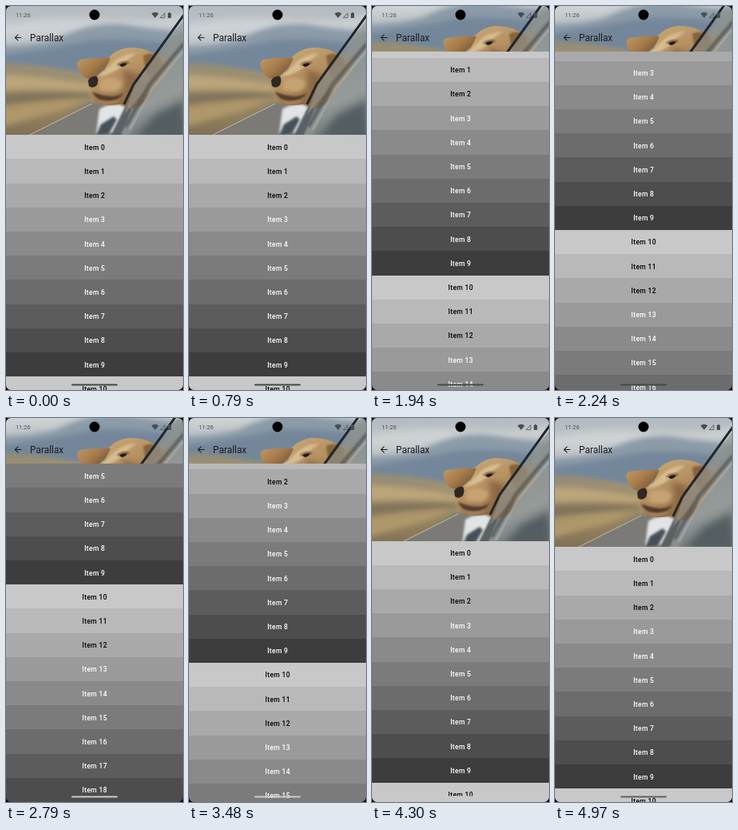
An HTML page with a canvas that plays this animation: 222 px wide and 480 px high, repeating every 5 s.

```html
<!DOCTYPE html>
<html lang="en">
<head>
<meta charset="utf-8">
<title>Parallax</title>
<style>
  html, body { margin: 0; width: 100%; height: 100%; overflow: hidden; background: #000; }
  canvas { display: block; width: 222px; height: 480px; }
</style>
</head>
<body>
<canvas id="stage" width="222" height="480"></canvas>
<script>
const W = 222, H = 480, LOOP = 5000;
const HEADER = 161.2, COLLAPSED = 57, ROW = 30.2, PARALLAX = 0.26;
const ctx = document.getElementById('stage').getContext('2d');

// Scroll offset over time: [ms, px]
const scrollKeys = [[0, 0], [1110, 0], [1520, 57], [1940, 126.5], [2790, 255], [3940, 66.5], [4430, 0], [LOOP, 0]];

const secant = i => (scrollKeys[i + 1][1] - scrollKeys[i][1]) / (scrollKeys[i + 1][0] - scrollKeys[i][0]);

const slopes = scrollKeys.map((_, i) => {
  if (i === 0 || i === scrollKeys.length - 1) return 0;
  const a = secant(i - 1), b = secant(i);
  return a * b <= 0 ? 0 : 2 * a * b / (a + b);
});

function scrollAt(t) {
  let i = 0;
  while (i < scrollKeys.length - 2 && t >= scrollKeys[i + 1][0]) i++;
  const [t0, y0] = scrollKeys[i], [t1, y1] = scrollKeys[i + 1];
  const d = t1 - t0, u = (t - t0) / d, v = 1 - u;
  return y0 * v * v * (1 + 2 * u) + y1 * u * u * (3 - 2 * u)
    + d * u * v * (slopes[i] * v - slopes[i + 1] * u);
}

const clamp01 = x => Math.min(1, Math.max(0, x));

function makePhoto() {
  const canvas = document.createElement('canvas');
  canvas.width = W;
  canvas.height = 164;
  const g = canvas.getContext('2d');
  const gradient = (x0, y0, x1, y1, ...colors) => {
    const fill = g.createLinearGradient(x0, y0, x1, y1);
    colors.forEach((c, i) => fill.addColorStop(i / (colors.length - 1), c));
    return fill;
  };
  const shape = (fill, path, blur = 0) => {
    g.filter = blur ? `blur(${blur}px)` : 'none';
    g.fillStyle = fill;
    g.fill(new Path2D(path));
  };
  const stroke = (color, width, path, blur = 0) => {
    g.filter = blur ? `blur(${blur}px)` : 'none';
    g.strokeStyle = color;
    g.lineWidth = width;
    g.stroke(new Path2D(path));
  };

  // Sky, hills, field and road
  shape(gradient(0, 0, 0, 70, '#b3bac0', '#c3c8cb', '#b9c0c4'), 'M0 0H222V164H0Z');
  shape('#ced2d4', 'M-10 26Q50 12 120 18T230 10V24Q110 34 -10 38Z', 5);
  shape('#8b9ba8', 'M-10 50Q30 50 62 42Q90 28 114 24Q140 20 165 26L232 34V90H-10Z', 3);
  shape('#74879a', 'M-10 62Q50 54 92 46Q130 36 232 50V88H-10Z', 3);
  shape(gradient(0, 70, 0, 164, '#8f8a78', '#a9966f', '#96835f', '#7d6f56'), 'M-10 70Q50 72 110 86H232V174H-10Z', 2);
  shape('#bba57a', 'M-10 86Q50 88 108 100V106Q50 102 -10 104Z', 3);
  shape('#82745a', 'M-10 110Q50 106 106 110V114Q50 118 -10 124Z', 3);
  shape('#ae976a', 'M-10 128Q50 118 100 117L70 130L-10 152Z', 3);
  shape('#7b7a77', 'M18 172L104 121L150 122V174H18Z', 1.5);
  stroke('#b5b0a4', 1.2, 'M24 164L108 122', .7);

  // Car door and side mirror
  shape('#8b908f', 'M222 30L162 96L138 164H222Z', 1);
  shape('#e1e4e5', 'M117 129Q126 122 142 123L150 126L134 158L113 160Z', 1.5);
  shape('#465058', 'M119 148L135 138L139 142L129 160L113 162Z', 1.5);
  shape('#596165', 'M151 124L158 128L143 164H131Z', 1);

  // Dog: neck and head
  shape(gradient(150, 62, 195, 125, '#b99566', '#a07c51', '#685039'),
    'M140 88L178 58Q204 62 201 84L176 118Q162 133 150 126L138 118Z', .8);
  shape(gradient(125, 52, 160, 124, '#c9a979', '#b48f60', '#80603f'),
    'M126 68Q136 54 154 52Q180 51 191 66Q191 86 174 100Q164 121 147 122Q128 126 115 122Q108 117 108 107Q101 101 104 91Q112 85 125 81Z', .6);

  // Ears
  shape(gradient(92, 64, 118, 94, '#bd9763', '#a67c4b', '#6f5031'),
    'M131 65Q113 64 93 67Q87 70 91 79Q97 92 106 91Q115 88 120 82Q127 76 131 65Z', .5);
  shape('#86633f', 'M172 62Q185 56 194 66Q198 80 188 94Q178 91 175 79Z', 1);

  // Muzzle, jaw and facial shading
  shape('#d8bd91', 'M131 74Q143 60 164 59Q151 67 142 78Q126 88 115 88Q122 82 131 74Z', 1.8);
  shape('#c6a373', 'M119 92Q132 86 146 94Q148 102 138 107Q124 108 117 104Z', 2.2);
  shape('#8b6744', 'M145 80Q157 80 171 91Q164 108 150 117Q155 98 145 80Z', 3.5);
  shape('#533d2b', 'M108 107Q119 112 131 113Q142 113 148 108Q143 118 128 119Q113 119 108 107Z', 1);
  shape('#a58056', 'M113 117Q127 121 143 117Q137 124 123 123Z', .8);
  shape('#302824', 'M103 93Q107 87 114 88Q117 92 114 99Q109 104 104 100Z', .7);
  stroke('#5d432c', 2, 'M140 74Q145 69 154 71', .8);
  shape('#211a17', 'M142 74Q146 70 152 72Q149 76 145 76Z', .3);

  // Window glass, blurred reflection and frame
  shape('#8d9390aa', 'M222 18L162 98L148 136L176 104L222 52Z', .6);
  shape('#a18c6caa', 'M200 62Q215 62 209 84L185 111L174 104Z', 4);
  shape(gradient(180, 70, 220, 155, '#8b9291', '#969b99', '#60696c'),
    'M222 54L183 105L153 164H222Z', 1.5);
  shape('#545e62', 'M222 119L187 136L163 164H222Z', 5);
  stroke('#565d5f', 4, 'M224 46L180 98L150 151', 1.5);
  stroke('#b7bcba', 1.5, 'M224 54L183 104L155 155', 1);
  stroke('#22272a', 3, 'M224 10L160 98L148 123', .4);
  return canvas;
}

const photo = makePhoto();

function text(value, x, y, size, weight, color, align = 'left', spacing = 0) {
  ctx.font = `${weight} ${size}px Roboto, sans-serif`;
  ctx.letterSpacing = spacing + 'px';
  ctx.textAlign = align;
  ctx.fillStyle = color;
  ctx.fillText(value, x, y);
}

function drawRows(scroll) {
  const first = Math.max(0, Math.floor((scroll - HEADER) / ROW));
  for (let i = first; HEADER + i * ROW - scroll < H; i++) {
    const y = HEADER + i * ROW - scroll, step = i % 10;
    const grey = Math.round(200 - step * 15.4);
    const top = Math.round(y);
    ctx.fillStyle = `rgb(${grey},${grey},${grey})`;
    ctx.fillRect(0, top, W, Math.round(y + ROW) - top);
    text('Item ' + i, 111.2, y + 18.5, 8.64, 500, step < 3 ? '#000' : '#fff', 'center', .27);
  }
}

function drawHeader(scroll) {
  const height = Math.max(COLLAPSED, HEADER - scroll);
  const travel = HEADER - height;
  ctx.save();
  ctx.beginPath();
  ctx.rect(0, 0, W, Math.round(height));
  ctx.clip();
  ctx.drawImage(photo, 0, -travel * PARALLAX);
  ctx.restore();

  ctx.save();
  ctx.translate(8.5, 33);
  ctx.scale(.54, .54);
  ctx.fillStyle = '#1c1b1f';
  ctx.fill(new Path2D('M20 11H7.8L13.4 5.4 12 4 4 12 12 20 13.4 18.6 7.8 13H20Z'));
  ctx.restore();
  text('Parallax', 30, 43.6, 11.88, 400, '#1c1b1f');
}

function drawStatusBar() {
  const color = '#4b4d4f';
  text('11:26', 12, 14.2, 7.5, 400, color);
  ctx.fillStyle = color;
  ctx.fill(new Path2D('M182.5 9.5Q187 6 191.5 9.5L187 15Z'));
  ctx.fill(new Path2D('M203 9H204.2V8H206V9H207.2V15H203Z'));
  ctx.strokeStyle = color;
  ctx.lineWidth = .8;
  ctx.stroke(new Path2D('M193.5 14.6L199 8.8V14.6Z'));
  ctx.fillStyle = '#000';
  ctx.beginPath();
  ctx.arc(111, 11, 6.5, 0, Math.PI * 2);
  ctx.fill();
}

function drawHandle(t) {
  const light = clamp01((t - 2350) / 120) - clamp01((t - 4850) / 150);
  const grey = Math.round(72 + 132 * light);
  ctx.fillStyle = `rgb(${grey},${grey},${grey})`;
  ctx.beginPath();
  ctx.roundRect(82, 472.4, 58, 2.2, 1.1);
  ctx.fill();
}

function drawCorners() {
  const path = new Path2D();
  path.rect(0, 0, W, H);
  path.roundRect(0, 0, W, H, 6);
  ctx.fillStyle = '#000';
  ctx.fill(path, 'evenodd');
}

function frame(now) {
  const t = now % LOOP, scroll = scrollAt(t);
  drawRows(scroll);
  drawHeader(scroll);
  drawStatusBar();
  drawHandle(t);
  drawCorners();
  requestAnimationFrame(frame);
}
requestAnimationFrame(frame);
</script>
</body>
</html>
```
